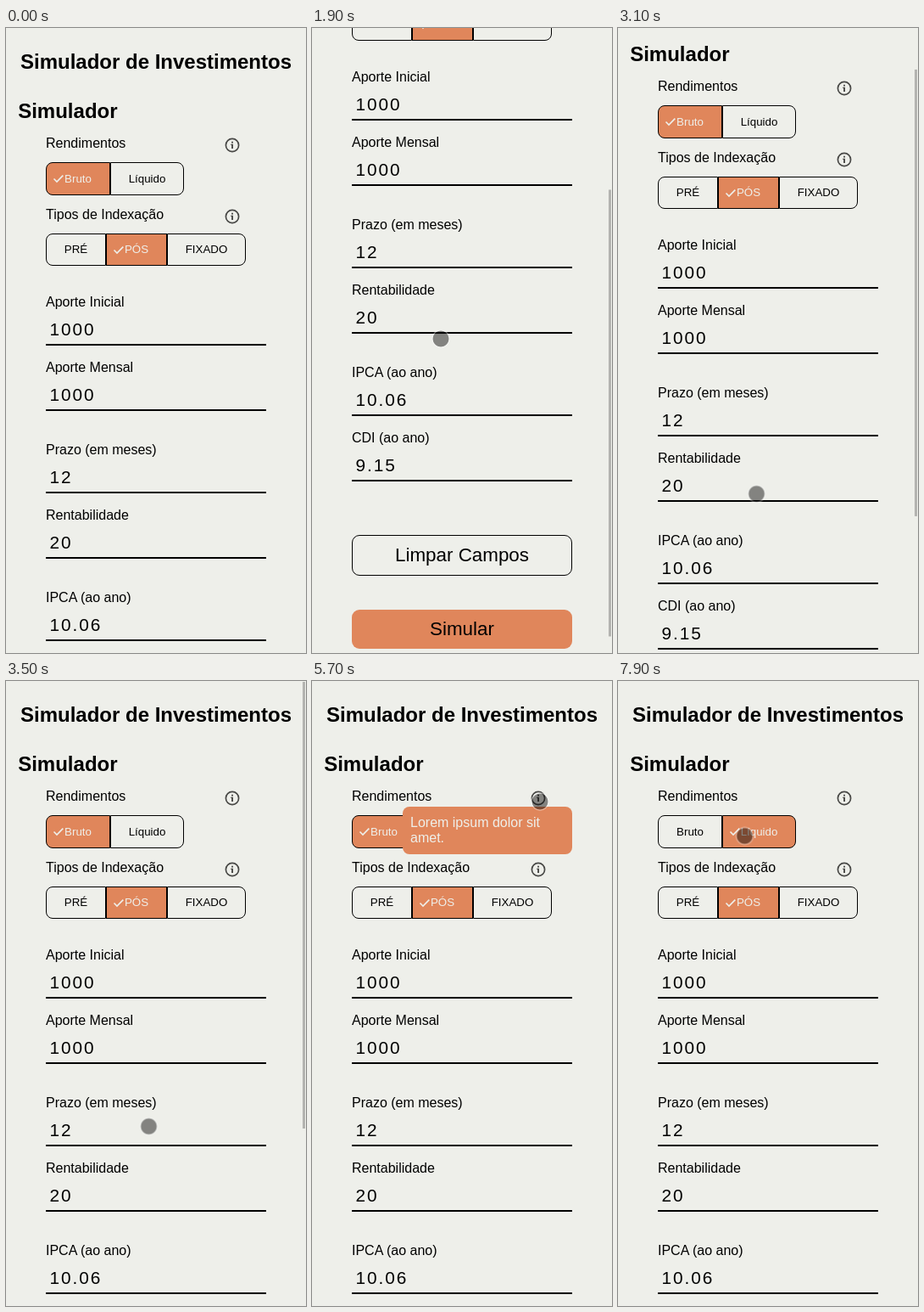
Recreate the animation shown at these times as an HTML page. Size 354 px wide and 736 px high, loop 8 s.

```html
<!DOCTYPE html>
<html lang="pt-BR">
<head>
<meta charset="utf-8">
<title>Simulador de Investimentos</title>
<style>
@property --scroll { syntax: "<number>"; inherits: true; initial-value: 0; }

:root { --bg: #eeefea; --accent: #e0865b; }
* { box-sizing: border-box; margin: 0; padding: 0; }
html, body { width: 100%; height: 100%; overflow: hidden; background: var(--bg); }
body { font: 16px/17px "Liberation Sans", Arial, sans-serif; color: #000; }

/* Every animation holds its value until the next key */
.stage, .thumb, .cursor, .caret, .tip, .bruto, .liquido {
  animation: 8s step-end -4ms infinite;
}
.stage {
  position: relative; width: 100%; height: 100%; overflow: hidden;
  animation-name: scroll;
}
.page {
  position: absolute; left: 0; top: 0; width: 354px; height: 1024px;
  transform: translateY(calc(var(--scroll) * -1px));
}
.page > * { position: absolute; }

h1, h2 { font-size: 24px; line-height: 27px; white-space: nowrap; }
h1 { left: 0; top: 26px; width: 354px; text-align: center; }
h2 { left: 14.2px; top: 84px; }

.label { left: 47px; }
.info { left: 258px; width: 18px; height: 18px; }

.seg {
  border: 1px solid #000; text-align: center;
  font-size: 13.333px; white-space: nowrap;
}
.row1 { top: 158px; height: 39px; line-height: 37px; }
.row2 { top: 242px; height: 38px; line-height: 36px; }
.first { border-radius: 8px 0 0 8px; }
.last { border-radius: 0 8px 8px 0; }
.on { background: var(--accent); color: var(--bg); }
.seg svg { position: absolute; left: 7px; top: 13px; width: 14px; height: 11px; }
.bruto { animation-name: unpick; }
.liquido { animation-name: pick; }

.field { left: 47px; width: 260px; height: 60px; border-bottom: 2px solid #000; }
.field b {
  display: block; margin-top: 12px; padding-left: 4.4px;
  font-weight: normal; font-size: 20.8px; line-height: 23px; letter-spacing: 2px;
}
.caret {
  left: 78px; top: 594px; width: 1px; height: 23px; background: #000;
  animation-name: caret;
}

.btn {
  left: 47px; width: 260px; border-radius: 9px;
  font-size: 22.4px; line-height: 46px; text-align: center;
}
.clear { top: 862px; height: 48px; border: 1px solid #000; }
.run { top: 950px; height: 46px; background: var(--accent); }

.tip {
  left: 107px; top: 148px; width: 200px; height: 56px; padding: 10px 9px;
  border-radius: 8px; background: var(--accent); color: var(--bg); line-height: 18px;
  animation-name: tip;
}

.thumb {
  position: absolute; left: 350px; top: 1px; width: 3px; height: 526px;
  background: #b3b3b0;
  transform: translateY(calc(var(--scroll) * .715px));
  animation-name: thumb;
}
.cursor {
  position: absolute; left: -11px; top: -11px; width: 22px; height: 22px;
  border-radius: 50%;
  background: radial-gradient(circle, rgba(0,0,0,.45) 9px, rgba(255,255,255,.4) 9.8px, rgba(255,255,255,.35) 10.4px, rgba(255,255,255,0) 11px);
  animation-name: cursor;
}

@keyframes scroll {
  0%, 18.75% { --scroll: 0; }
  20% { --scroll: 26; }
  21.25% { --scroll: 101; }
  22.5% { --scroll: 201; }
  23.75% { --scroll: 265; }
  25% { --scroll: 275; }
  26.25% { --scroll: 278; }
  27.5%, 32.5% { --scroll: 279; }
  33.75% { --scroll: 265; }
  35% { --scroll: 220; }
  36.25% { --scroll: 163; }
  37.5% { --scroll: 109; }
  38.75% { --scroll: 67; }
  40% { --scroll: 31; }
  41.25%, 100% { --scroll: 0; }
}
@keyframes thumb {
  0% { opacity: 0; }
  20% { opacity: 1; }
  48.75% { opacity: .8; }
  50% { opacity: .5; }
  51.25% { opacity: .2; }
  52.5%, 100% { opacity: 0; }
}
@keyframes cursor {
  0% { opacity: 0; translate: 140px 645px; }
  18.75% { opacity: 1; translate: 140px 640px; }
  20% { opacity: 1; translate: 142px 605px; }
  21.25% { translate: 145px 530px; }
  22.5% { translate: 149px 430px; }
  23.75% { translate: 152px 366px; }
  25% { translate: 153px 356px; }
  26.25% { translate: 154px 353px; }
  27.5% { translate: 154px 352px; }
  30% { translate: 169.5px 543.5px; }
  31.25% { translate: 167px 420px; }
  32.5% { translate: 164px 336px; }
  33.75% { translate: 163px 350px; }
  35% { translate: 162px 395px; }
  36.25% { translate: 162px 452px; }
  37.5% { translate: 163px 506px; }
  38.75% { translate: 163.5px 548.5px; }
  40% { translate: 164px 584px; }
  41.25% { translate: 165px 615px; }
  42.5% { translate: 166px 596px; }
  43.75% { translate: 168.5px 524.5px; }
  45% { translate: 192px 460px; }
  46.25% { translate: 229px 390px; }
  48.75% { translate: 236px 365px; }
  50% { translate: 248px 310px; }
  51.25% { translate: 259px 245px; }
  52.5% { translate: 266px 195px; }
  53.75% { translate: 270px 166px; }
  55% { translate: 272px 154px; }
  61.25% { translate: 270px 136px; }
  62.5% { translate: 269.5px 141px; }
  71.25% { translate: 269px 142px; }
  72.5% { translate: 269.5px 142.5px; }
  80% { translate: 277px 152px; }
  81.25% { translate: 304px 188px; }
  82.5% { translate: 317px 205px; }
  86.25% { translate: 240px 192px; }
  87.5% { translate: 186px 183.5px; }
  92.5% { translate: 182px 182px; }
  93.75% { translate: 184px 183px; }
  98.75%, 100% { opacity: 1; translate: 149.5px 182.5px; }
}
@keyframes caret {
  0% { opacity: 0; }
  58.75% { opacity: 1; }
  61.25%, 100% { opacity: 0; }
}
@keyframes tip {
  0% { opacity: 0; }
  62.5% { opacity: 1; }
  77.5%, 100% { opacity: 0; }
}
@keyframes unpick {
  0% { background: var(--accent); color: var(--bg); }
  90%, 100% { background: var(--bg); color: #000; }
}
@keyframes pick {
  0% { background: var(--bg); color: #000; }
  90%, 100% { background: var(--accent); color: var(--bg); }
}
</style>
</head>
<body>
<svg width="0" height="0" style="position:absolute">
  <symbol id="check" viewBox="0 0 14 11">
    <path d="M1.5 5.5 5 9 12.3 1.6" fill="none" stroke="#eeefea" stroke-width="1.6"/>
  </symbol>
  <symbol id="info" viewBox="0 0 18 18">
    <circle cx="9" cy="9" r="7.6" fill="none" stroke="#484846" stroke-width="1.7"/>
    <path d="M8.1 4.7h1.9v1.9H8.1zM7.3 7.7H10v5.2H8.1V9h-.8z" fill="#484846"/>
  </symbol>
</svg>

<div class="stage">
  <div class="page">
    <h1>Simulador de Investimentos</h1>
    <h2>Simulador</h2>

    <div class="label" style="top:127px">Rendimentos</div>
    <svg class="info" style="top:129px"><use href="#info"/></svg>
    <div class="seg row1 first bruto" style="left:47px;width:76px"><svg><use href="#check"/></svg>Bruto</div>
    <div class="seg row1 last liquido" style="left:123px;width:87px"><svg><use href="#check"/></svg>Líquido</div>

    <div class="label" style="top:211px">Tipos de Indexação</div>
    <svg class="info" style="top:213px"><use href="#info"/></svg>
    <div class="seg row2 first" style="left:47px;width:71px">PRÉ</div>
    <div class="seg row2 on" style="left:118px;width:72px"><svg><use href="#check"/></svg>PÓS</div>
    <div class="seg row2 last" style="left:190px;width:93px">FIXADO</div>

    <div class="field" style="top:314px">Aporte Inicial<b>1000</b></div>
    <div class="field" style="top:391px">Aporte Mensal<b>1000</b></div>
    <div class="field" style="top:488px">Prazo (em meses)<b>12</b></div>
    <div class="field" style="top:565px">Rentabilidade<b>20</b></div>
    <div class="field" style="top:662px">IPCA (ao ano)<b>10.06</b></div>
    <div class="field" style="top:739px">CDI (ao ano)<b>9.15</b></div>
    <div class="caret"></div>

    <div class="btn clear">Limpar Campos</div>
    <div class="btn run">Simular</div>

    <div class="tip">Lorem ipsum dolor sit<br>amet.</div>
  </div>
  <div class="thumb"></div>
  <div class="cursor"></div>
</div>
</body>
</html>
```
